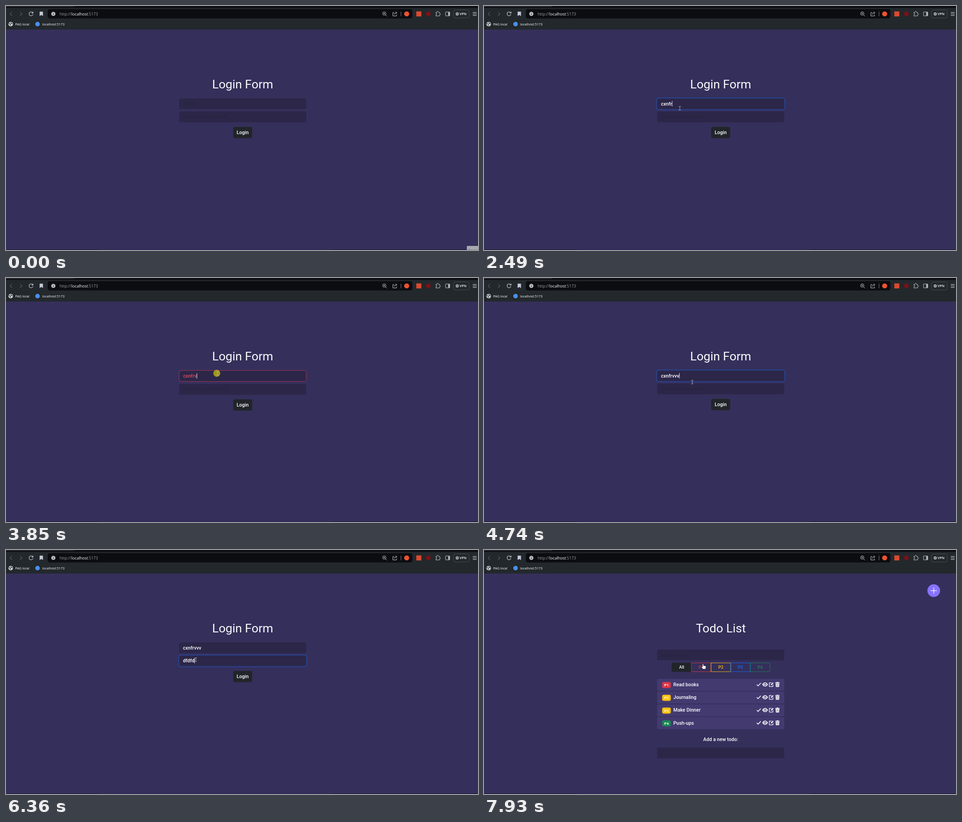
Recreate the animation shown at these times as an HTML page. Size 1039 px wide and 539 px high, loop 8000 ms.

```html
<!DOCTYPE html>
<html lang="en">
<head>
<meta charset="utf-8">
<title>Login form</title>
<style>
html, body { margin: 0; width: 100%; height: 100%; overflow: hidden; background: #352f5b; }
svg { display: block; width: 1039px; height: 539px; font-family: Roboto, sans-serif; fill: #fff; }
text { white-space: pre; }
.ui { font-family: "Open Sans", "Noto Sans", sans-serif; }
.title { font-size: 26.67px; text-anchor: middle; fill: #f8f9fa; }
.body { font-size: 10.67px; font-weight: 500; }
.hint { font-size: 10.67px; fill: #25253a; }
.mid { text-anchor: middle; }
.line { fill: none; stroke: #c3c8cf; stroke-width: 1; }
.ring { fill: none; stroke: #2b3f84; stroke-width: 2.7; }
.field { fill: #2c2649; }
</style>
</head>
<body>
<svg viewBox="0 0 1039 539">
  <rect width="1039" height="539" fill="#352f5b"/>

  <g id="chrome">
    <rect width="1039" height="52" fill="#23282c"/>
    <rect width="1039" height="4.3" fill="#0c0e12"/>
    <rect width="150" height="1.5" fill="#30353a"/>
    <rect x="92" y="7" width="802.5" height="20.5" rx="4.5" fill="#0b0d11"/>
    <path class="line" d="M13 13.3L8.8 17.4L13 21.5M31 13.3L35.2 17.4L31 21.5" style="stroke:#5d6267;stroke-width:1.1"/>
    <path class="line" d="M58.9 15.2A4.3 4.3 0 1 0 59.3 18.4M59.6 12.6V15.7H56.4" style="stroke-width:1.2"/>
    <path d="M74 13.3Q74 12.5 74.8 12.5H80.6Q81.4 12.5 81.4 13.3V22.3L77.7 19.8L74 22.3Z" fill="#c3c9d6"/>
    <circle cx="104.2" cy="17.4" r="4.6" fill="#bcc0c5"/>
    <path d="M104.2 16.7V20M104.2 14.5V15.6" stroke="#0b0d11" stroke-width="1.1"/>
    <g class="ui" font-size="8.7" fill="#989ca1">
      <text x="118" y="20.6">http://</text>
      <text x="143.8" y="20.6" fill="#fff">localhost</text>
      <text x="180.3" y="20.6">:5173</text>
    </g>
    <g class="line">
      <circle cx="832.7" cy="16.6" r="3.7"/>
      <path d="M835.5 19.4L838.5 22.4M831 16.6H834.4M832.7 14.9V18.3"/>
      <path d="M854.5 14.4H851.6V22H859.6V19M854.3 19Q854.8 15 860 15M857.6 12.4L860.5 15L857.6 17.6"/>
      <path d="M869.5 12.5V22.5" stroke="#777c82"/>
      <path d="M946.3 14H948.6A1.7 1.7 0 1 1 951.8 14H954.2V16.4A1.7 1.7 0 1 1 954.2 19.6V22H946.3V19.5A1.6 1.6 0 1 0 946.3 16.4Z"/>
      <rect x="967.5" y="13.2" width="9.4" height="8.6" rx="1"/>
      <path d="M975 13.5V21.5" stroke-width="3"/>
      <rect x="985" y="8.5" width="34.5" height="18" rx="4" style="stroke:#454a50"/>
      <path d="M1027.5 14.4H1036M1027.5 17.5H1036M1027.5 20.6H1036" stroke-width="1.1"/>
    </g>
    <circle cx="882" cy="17.4" r="5.5" fill="#f0532d"/>
    <rect x="903.2" y="12" width="11" height="11" fill="#d94a30"/>
    <circle cx="929.6" cy="17.4" r="5.1" fill="#800f16"/>
    <circle cx="993.3" cy="17.4" r="3.5" fill="#a9aeb4"/>
    <path d="M991.3 17.4H995.3" stroke="#23282c"/>
    <text class="ui" x="998.6" y="20.1" font-size="7.4" font-weight="600">VPN</text>
    <circle cx="10.4" cy="40" r="5" fill="#cbd0d6"/>
    <path d="M6.5 38L9.5 40.5L10 43.5M10.5 36L11 38L14.3 39.3" fill="none" stroke="#23282c" stroke-width="1.4"/>
    <circle cx="69.4" cy="40" r="5" fill="#4a8fe8"/>
    <g class="ui" font-size="7.3">
      <text x="20.2" y="42.6">PAG local</text>
      <text x="79.6" y="42.6">localhost:5173</text>
    </g>
  </g>
  <path d="M0 538.5H1039" stroke="#15182c"/>
  <path d="M205 538.5H718" stroke="#1b2557"/>
  <g id="tip">
    <rect x="1014.5" y="530" width="25" height="9" fill="#a9a8b3"/>
    <text class="ui" x="1018" y="541.5" font-size="7" fill="#4d4c58">Recorder</text>
  </g>

  <g id="login">
    <text class="title" x="521" y="181.6">Login Form</text>
    <rect id="mailBox" class="field" x="381" y="204.2" width="280" height="23.9" rx="4"/>
    <rect id="mailRing" class="ring" x="379.9" y="203.1" width="282.2" height="26" rx="5"/>
    <text id="mailHint" class="hint" x="389.4" y="219.8">Email</text>
    <text id="mail" class="body" x="389.4" y="219.8"></text>
    <g id="lower">
      <rect class="field" x="381" y="232.9" width="280" height="23.9" rx="4"/>
      <rect id="passRing" class="ring" x="379.9" y="231.8" width="282.2" height="26" rx="5"/>
      <text id="passHint" class="hint" x="389.4" y="248.3">Enter your password</text>
      <text id="pass" class="body" x="389.4" y="248.3"></text>
      <rect id="button" x="500.2" y="267" width="41.8" height="25" rx="4"/>
      <text class="body mid" x="521" y="282.7">Login</text>
    </g>
    <rect id="caret" width="0.9" height="12"/>
  </g>

  <g id="todo">
    <text class="title" x="521.5" y="181.6">Todo List</text>
    <circle cx="990" cy="89.8" r="14" fill="#8673fb"/>
    <path d="M983.3 89.8H996.7M990 83.1V96.5" stroke="#fff" stroke-width="1.3"/>
    <rect class="field" x="381" y="220" width="280" height="23.8" rx="4"/>
    <text class="hint" x="389.4" y="235.6">Search todo</text>
    <g id="filters"></g>
    <g id="rows"></g>
    <text class="body mid" x="521" y="422">Add a new todo:</text>
    <rect class="field" x="381" y="436.4" width="280" height="23.8" rx="4"/>
  </g>

  <circle id="click" r="7.7" fill="#cbc312" opacity=".72"/>
  <g id="pointer">
    <path id="arrow" d="M0 0V10.6L2.5 8.3L4.1 12L5.8 11.3L4.2 7.6H7.6Z" stroke="#111" stroke-width=".6"/>
    <path id="beam" d="M-2.4 -4H-.6L0 -3.5L.6 -4H2.4M0 -3.5V3.5M-2.4 4H-.6L0 3.5L.6 4H2.4" fill="none" stroke="#b9b8bd" stroke-width=".9"/>
    <path id="hand" d="M-1 .8Q0 -.5 1 .8V4.2L5.6 5.2Q6.7 5.6 6.5 6.8L5.7 12H-.2L-3 8Q-3.3 6.4 -1.9 6.8L-1 7.6Z" stroke="#222" stroke-width=".6"/>
  </g>
</svg>
<script>
const LOOP = 8000;
const $ = id => document.getElementById(id);
const clamp = v => Math.max(0, Math.min(1, v));
const ramp = (t, from, to) => clamp((t - from) / (to - from));
const within = (t, from, to) => t >= from && t < to;
const show = (el, on) => el.setAttribute('display', on ? 'inline' : 'none');

const RED = '#dc3545', YELLOW = '#ffc107', BLUE = '#0d6efd', GREEN = '#198754', DARK = '#212529';
const ERROR_ON = 3220, ERROR_OFF = 4260, OPEN_TODO = 7660;

// time, x, y of the pointer's hot spot
const path = [
  [70, 1036, 545], [830, 434, 227.5], [890, 431, 226], [2830, 431, 226],
  [3120, 349, 231], [3370, 349, 231], [3440, 353, 229], [3780, 464, 210.5],
  [3850, 466, 211], [4590, 466, 211], [4740, 458.5, 230], [4860, 453, 246],
  [5160, 453, 246], [5450, 438, 260], [5740, 418, 242], [6800, 418, 242],
  [7250, 545, 281], [7320, 545, 281], [7460, 524, 280], [7660, 524, 280], [7930, 482, 251]
];
// start, end, x, y
const clicks = [
  [890, 1040, 431, 226], [3150, 3300, 349, 231], [3760, 3915, 464, 210.5],
  [4870, 5010, 453, 246], [7440, 7620, 524, 280]
];
const mail = { text: 'cxnfrvvv', keys: [1700, 1830, 2030, 2220, 2490, 2690, 4260, 4530] };
const pass = { text: 'dfdfdsf', keys: [5880, 6010, 6110, 6220, 6360, 6560, 6700] };
// each of these restarts the caret's blink
const wakes = [970, 3780, 4870, ...mail.keys, ...pass.keys];

function buildTodo() {
  const icons = `<g fill="none" stroke="#fff">
    <path d="M600.5 297.3L603.3 300.2L609.3 293.8" stroke-width="1.6"/>
    <path d="M633 293.3H628.8Q628 293.3 628 294.1V300.9Q628 301.7 628.8 301.7H635.3Q636.1 301.7 636.1 300.9V297.6" stroke-width="1.3"/>
    <path d="M631.8 298L636.6 293.2" stroke-width="2.2"/>
    </g>
    <path fill-rule="evenodd" d="M612.6 297Q615 292.5 618.7 292.5T624.8 297Q622.4 301.5 618.7 301.5T612.6 297ZM621.7 297A3 3 0 1 0 615.7 297A3 3 0 1 0 621.7 297ZM620.5 297A1.8 1.8 0 1 1 618.7 295.2Q618.5 297 620.5 297Z"/>
    <path d="M641.2 292.6H644L644.5 291.6H647.5L648 292.6H650.8V294H641.2ZM641.9 294.7H650.1L649.6 301.7Q649.5 302.5 648.7 302.5H643.3Q642.5 302.5 642.4 301.7Z"/>
    <path d="M644.2 295.9V301.1M646 295.9V301.1M647.8 295.9V301.1" stroke="#433a70" stroke-width=".6"/>`;
  const items = [['P1', 'Read books', RED], ['P2', 'Journaling', YELLOW],
                 ['P2', 'Make Dinner', YELLOW], ['P4', 'Push-ups', GREEN]];
  $('rows').innerHTML = items.map(([tag, name, color], i) => `<g transform="translate(0 ${i * 28.2})">
    <rect x="381" y="284.5" width="280" height="26.6" rx="3.5" fill="#433a70"/>
    <rect x="392.2" y="291.6" width="19" height="13.4" rx="3.6" fill="${color}"/>
    <text class="mid" x="401.7" y="301.2" font-size="8" font-weight="700">${tag}</text>
    <text class="body" x="416.8" y="301">${name}</text>${icons}</g>`).join('');

  const filters = [['All', DARK], ['P1', RED], ['P2', YELLOW], ['P3', BLUE], ['P4', GREEN]];
  $('filters').innerHTML = filters.map(([name, color], i) => {
    const x = 413.4 + i * 43.15, y = 249.4, w = 43.4, h = 19.4;
    const l = i == 0 ? 2.5 : 0, r = i == 4 ? 2.5 : 0;
    const d = `M${x + l} ${y}H${x + w - r}q${r} 0 ${r} ${r}v${h - 2 * r}q0 ${r} ${-r} ${r}` +
      `H${x + l}q${-l} 0 ${-l} ${-l}v${2 * l - h}q0 ${-l} ${l} ${-l}Z`;
    return `<path d="${d}" fill="${i ? 'none' : DARK}" stroke="${color}" stroke-width=".9"/>
      <text class="mid" x="${x + w / 2}" y="262.3" font-size="9.33" font-weight="500" fill="${i ? color : '#fff'}">${name}</text>`;
  }).join('');
}

function pointerAt(t) {
  const next = path.findIndex(p => p[0] > t);
  if (next <= 0) return path[next ? path.length - 1 : 0].slice(1);
  const [a, b] = [path[next - 1], path[next]];
  const u = ramp(t, a[0], b[0]), k = u * u * (3 - 2 * u);
  return [a[1] + (b[1] - a[1]) * k, a[2] + (b[2] - a[2]) * k];
}

function pointerKind(x, y, todo) {
  if (todo) return within(x, 413, 630) && within(y, 249, 269) ? 'hand' : 'arrow';
  if (within(x, 500, 542) && within(y, 267, 292)) return 'hand';
  return within(x, 381, 661) && within(y, 204, 257) ? 'beam' : 'arrow';
}

function fillField(id, field, t) {
  const count = field.keys.filter(k => k <= t).length;
  $(id).textContent = field.text.slice(0, count);
  show($(id + 'Hint'), !count);
  return count ? $(id).getComputedTextLength() : 0;
}

function drawForm(t, hover) {
  const error = within(t, ERROR_ON, ERROR_OFF), box = $('mailBox');
  const mailWidth = fillField('mail', mail, t), passWidth = fillField('pass', pass, t);

  box.setAttribute('height', error ? 24.4 : 23.9);
  box.setAttribute('stroke', error ? '#b5364f' : 'none');
  box.setAttribute('stroke-width', .9);
  $('mailRing').setAttribute('height', error ? 27 : 26);
  $('mail').setAttribute('x', error ? 390 : 389.4);
  $('mail').setAttribute('y', error ? 220.4 : 219.8);
  $('mail').setAttribute('fill', error ? '#e6485b' : '#fff');
  $('lower').setAttribute('transform', `translate(0 ${error ? 1.1 : 0})`);

  const first = ramp(t, 890, 1070) - ramp(t, 3160, 3310);
  const second = ramp(t, 3855, 3920) - ramp(t, 4870, 5000);
  $('mailRing').setAttribute('opacity', first + second);
  $('passRing').setAttribute('opacity', ramp(t, 4870, 5000));
  $('button').setAttribute('fill', hover ? '#45494b' : DARK);

  const inPass = t >= 4870;
  const focused = inPass || within(t, 890, 3160) || t >= 3760;
  const wake = Math.max(0, ...wakes.filter(w => w <= t));
  const lit = t < 970 || (t - wake) % 1060 < 530;
  show($('caret'), focused && lit);
  $('caret').setAttribute('x', (error ? 390 : 389.4) + (inPass ? passWidth : mailWidth) - .1);
  $('caret').setAttribute('y', inPass ? 238.4 : error ? 210.4 : 209.8);
}

function draw(t) {
  const todo = t >= OPEN_TODO;
  const [x, y] = pointerAt(t), kind = pointerKind(x, y, todo);
  show($('tip'), t < 70);
  show($('login'), !todo);
  show($('todo'), todo);
  if (!todo) drawForm(t, kind == 'hand');

  const hit = clicks.find(c => within(t, c[0], c[1]));
  show($('click'), hit);
  if (hit) {
    $('click').setAttribute('cx', hit[2]);
    $('click').setAttribute('cy', hit[3]);
  }
  $('pointer').setAttribute('transform', `translate(${x} ${y})`);
  for (const id of ['arrow', 'beam', 'hand']) show($(id), id == kind);
}

buildTodo();
const start = performance.now();
function tick() {
  draw((performance.now() - start) % LOOP);
  requestAnimationFrame(tick);
}
tick();
</script>
</body>
</html>
```
